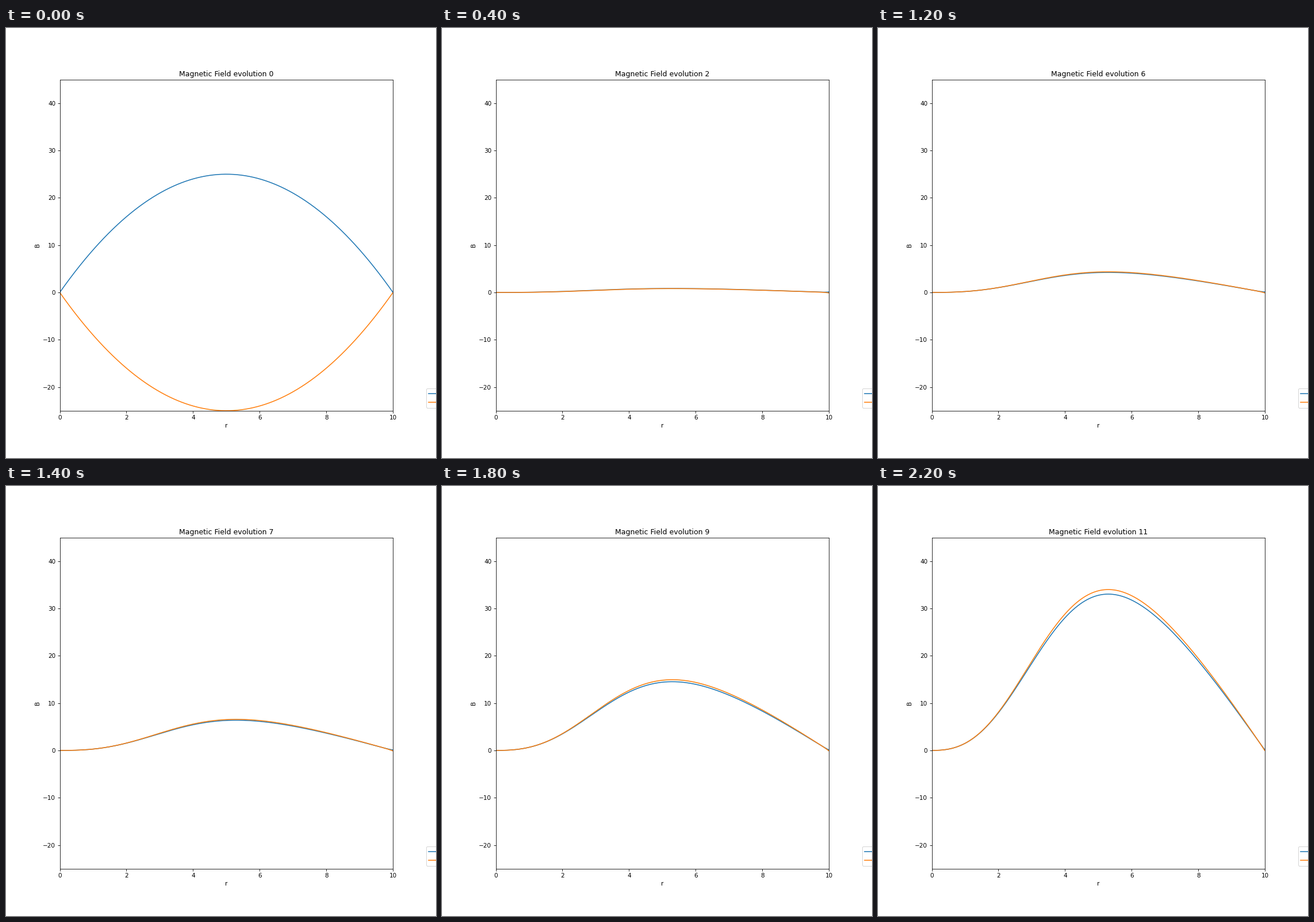
These frames come from a looping animation (748x748 px, 2.4 s). A matplotlib script:

```python
import numpy as np
import matplotlib.pyplot as plt
from matplotlib.animation import FuncAnimation

FRAMES = 12
INTERVAL = 200
GROWTH = 1.508      # gain of the growing mode per step
PEAK = 32.92        # its scale in the last step
DECAY = 0.0325      # factor of the decaying mode per step

r = np.arange(0, 10, 0.01)
parabola = r * (10 - r)

# Growing mode: a skewed parabola, damped near the axis
damping = 1 - np.exp(-(0.035 * r + 0.055 * r**2 + 0.006 * r**3))
mode = parabola * (0.0583 - 0.0028 * r) * damping
ratio = 1 + 0.0292 * (1 - np.exp(-(r / 2.2) ** 2))
edge = 0.1 * np.exp((r - r[-1]) / 0.1)   # end values stay fixed


def fields(step):
    if step == 0:
        return parabola, -parabola
    grow = PEAK * GROWTH ** (step - FRAMES + 1) * mode
    fade = 25 * DECAY ** step * np.sin(np.pi * r / 10)
    return grow + fade + edge, ratio * (grow - fade) - edge


fig, ax = plt.subplots(figsize=(10, 10), dpi=74.8)
fig.subplots_adjust(left=0.125, right=0.9, bottom=0.11, top=0.88)
line_r, = ax.plot([], [], label="Br")
line_phi, = ax.plot([], [], label="Bphi")
ax.set(xlim=(0, 10), ylim=(-25, 45), xlabel="r", ylabel="B")
title = ax.set_title("")
ax.legend(loc="lower left", bbox_to_anchor=(1.091, 0))


def update(step):
    b_r, b_phi = fields(step)
    line_r.set_data(r, b_r)
    line_phi.set_data(r, b_phi)
    title.set_text(f"Magnetic Field evolution {step}")
    return line_r, line_phi, title


anim = FuncAnimation(fig, update, frames=FRAMES, interval=INTERVAL,
                     repeat=True, repeat_delay=0, blit=False)
plt.show()
```
